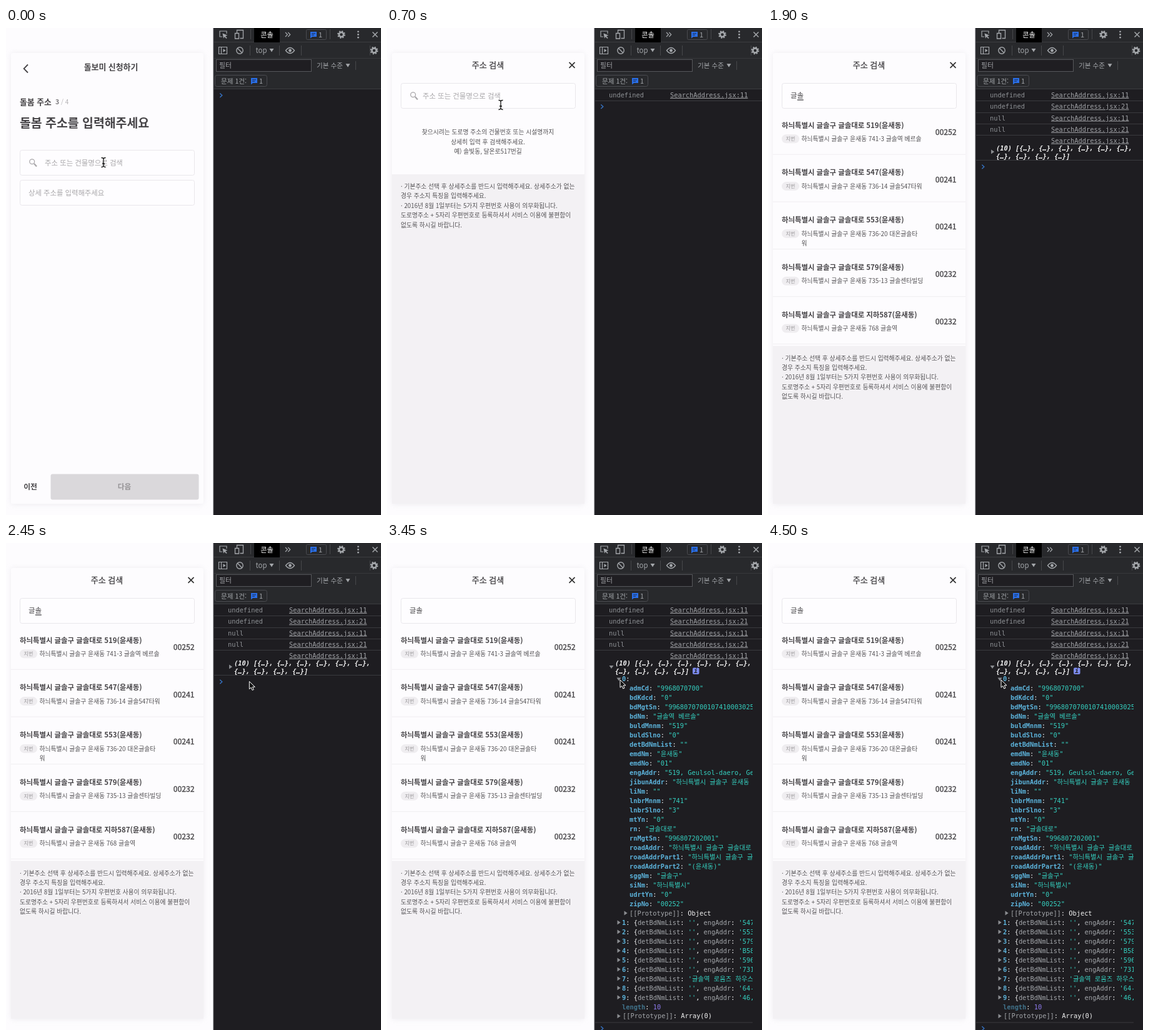
An HTML page that plays this animation: 600 px wide and 779 px high, repeating every 4550 ms.

```html
<!DOCTYPE html>
<html lang="ko">
<head>
<meta charset="utf-8">
<title>주소 검색</title>
<style>
html, body { margin: 0; width: 100%; height: 100%; overflow: hidden; background: #fdfcfe; }
svg { display: block; width: 100vw; height: 100vh; }
text { white-space: pre; font-family: "Noto Sans CJK KR", "Noto Sans CJK", "Noto Sans", sans-serif; }
.mono { font-family: "DejaVu Sans Mono", "Noto Sans CJK KR", "Noto Sans CJK", monospace; font-size: 10.33px; }
.b { font-weight: 700; }
.m { stroke: #464447; stroke-width: .35px; }
.log { fill: #8f9296; }
.link { fill: #a0a2a6; text-decoration: underline; }
.key { fill: #5cb3db; font-weight: 700; }
.dim { fill: #41738b; font-weight: 700; }
.str { fill: #35d0c0; }
.num { fill: #8f7cf0; }
.pale { fill: #a3a6aa; }
.wht { fill: #f3f3f3; }
</style>
</head>
<body>
<svg id="stage" viewBox="0 0 600 779" xmlns="http://www.w3.org/2000/svg"></svg>
<script>
const LOOP = 4550;
const INK = '#464447', TOOL = '#a4a7ab';

const text = (x, mid, s, size, fill, cls = '', anchor = 'start') =>
  `<text x="${x}" y="${mid + size * 0.37}" font-size="${size}" fill="${fill}" class="${cls}" text-anchor="${anchor}">${s}</text>`;
const rect = (x, y, w, h, fill, more = '') =>
  `<rect x="${x}" y="${y}" width="${w}" height="${h}" fill="${fill}" ${more}/>`;
const path = (d, stroke, w = 1, fill = 'none', more = '') =>
  `<path d="${d}" stroke="${stroke}" stroke-width="${w}" fill="${fill}" ${more}/>`;
const group = (id, body) => `<g id="${id}">${body}</g>`;
const mono = (x, mid, body, cls = '') => `<text x="${x}" y="${mid + 3.7}" class="mono ${cls}">${body}</text>`;
const span = (cls, s) => `<tspan class="${cls}">${s}</tspan>`;
const field = y => rect(22.5, y + .5, 279, 40, '#fefdff', 'rx="3" stroke="#e9e7eb"');
const lens = y => path(`M45 ${y + 2}L49 ${y + 6.5}`, '#a9a7aa', 2.2) +
  `<circle cx="41.7" cy="${y - 1.3}" r="3.9" fill="none" stroke="#a9a7aa" stroke-width="1.3"/>`;

// ---- left: form and search pages
const formPage = () =>
  path('M35 58.5L28.6 65L35 71.5', INK, 1.8) +
  text(168, 62.5, '돌보미 신청하기', 12.9, INK, 'b', 'middle') +
  text(22, 118, '돌봄 주소', 12.8, INK, 'b') +
  text(79, 118, '3', 10.5, '#7d7b7e', 'b') +
  text(88, 118, '/ 4', 10, '#b3b1b4') +
  text(22, 151.5, '돌봄 주소를 입력해주세요', 19.4, INK, 'b') +
  field(195) + lens(215) + text(62, 215.5, '주소 또는 건물명으로 검색', 11.4, '#a8a6a9') +
  field(243) + text(36, 263.5, '상세 주소를 입력해주세요', 11.35, '#a8a6a9') +
  text(39, 733.5, '이전', 11.8, INK, 'b', 'middle') +
  rect(71.5, 713.5, 237, 41, '#dad8db', 'rx="3"') +
  text(189.5, 733.5, '다음', 11.6, '#959396', 'b', 'middle');

const notice = [
  '· 기본주소 선택 후 상세주소를 반드시 입력해주세요. 상세주소가 없는',
  '경우 주소지 특징을 입력해주세요.',
  '· 2016년 8월 1일부터는 5가지 우편번호 사용이 의무화됩니다.',
  '도로명주소 + 5자리 우편번호로 등록하셔서 서비스 이용에 불편함이',
  '없도록 하시길 바랍니다.'
];
const guide = ['찾으시려는 도로명 주소의 건물번호 또는 시설명까지', '상세히 입력 후 검색해주세요.', '예) 솔빛동, 달온로517번길'];

const CITY = '하늬특별시 글솔구';
const places = [
  ['519', '741-3 글솔역 베르솔', '00252'],
  ['547', '736-14 글솔547타워', '00241'],
  ['553', '736-20 대온글솔타', '00241', '워'],
  ['579', '735-13 글솔센타빌딩', '00232'],
  ['지하587', '768 글솔역', '00232']
];
const placeRow = ([no, lot, zip, wrap], i) => {
  const y = 155.3 + i * 75.8;
  return text(22, y, `${CITY} 글솔대로 ${no}(윤새동)`, 11.4, INK, 'b') +
    rect(22, y + 15, 28, 14, '#efedf0', 'rx="7"') +
    text(36, y + 22, '지번', 8.1, '#99979a', '', 'middle') +
    text(53.5, y + 22, `${CITY} 윤새동 ${lot}`, 9.8, '#525053') +
    (wrap ? text(53.5, y + 37.3, wrap, 9.8, '#525053') : '') +
    text(301.5, y + 11, zip, 12.2, INK, 'm', 'end') +
    rect(8, y + 46.4, 308, 1, '#f0eef1');
};

const searchPage = () =>
  text(161.5, 59, '주소 검색', 13, INK, 'm', 'middle') +
  path('M291.5 54.8L300.5 63.8M300.5 54.8L291.5 63.8', '#333', 1.7) +
  field(88) +
  group('hint', lens(108) + text(57, 108.5, '주소 또는 건물명으로 검색', 11.4, '#a8a6a9')) +
  `<text id="typed" x="36" y="112.3" font-size="11.4" fill="#4d4b4e"></text>` +
  rect(36, 114.4, 10, 1.3, '#454346', 'id="compose"') +
  group('guide', guide.map((s, i) => text(161.5, 166.5 + i * 15.4, s, 9.78, '#525053', '', 'middle')).join('')) +
  group('rows', places.map(placeRow).join('')) +
  rect(8, 234, 308, 527, '#f3f1f4', 'id="sheet"') +
  group('notice', notice.map((s, i) => text(22, 253.5 + i * 15.35, s, 9.75, '#525053')).join(''));

// ---- right: developer tools
const gear = (x, y) =>
  `<circle cx="${x}" cy="${y}" r="3.6" fill="none" stroke="${TOOL}" stroke-width="2.6"/>` +
  `<circle cx="${x}" cy="${y}" r="5.4" fill="none" stroke="${TOOL}" stroke-width="2" stroke-dasharray="2.1 2.14"/>`;
const bubble = (x, y) => path(`M${x} ${y}h10v8h-7l-3 2.6z`, 'none', 0, '#2a6fe8') +
  path(`M${x + 2} ${y + 2.8}h6M${x + 2} ${y + 5.2}h4`, '#1d2a48', 1);
const bar = (x, y, h = 16) => rect(x, y, 1, h, '#46474b');
const drop = (x, y) => path(`M${x} ${y}h7l-3.5 5.5z`, 'none', 0, TOOL);

const toolbar = () =>
  rect(332, 0, 268, 97, '#28292c') + rect(332, 22, 268, 1, '#3c3d40') +
  rect(332, 48, 268, 1, '#37383b') + rect(332, 97, 268, 1, '#3b3c40') +
  path('M346 14h-4V5h11v4', TOOL, 1.2) + path('M346.5 8.5l8 3.2-3.4 1.2 2.6 3-1.4 1.2-2.6-3-1.7 2.6z', 'none', 0, TOOL) +
  path('M369.5 8V3.5h10v13h-5M366.5 8.5h6v8.5h-6z', TOOL, 1.3) +
  bar(391, 2) + rect(397, 0, 41, 23, '#000') + text(417.5, 10.5, '콘솔', 11.2, '#fff', '', 'middle') +
  path('M447 7l3.4 3.5-3.4 3.5M451.3 7l3.4 3.5-3.4 3.5', TOOL, 1.2) +
  rect(480.5, 2.5, 32, 16, 'none', 'rx="2" stroke="#4a4b50"') + bubble(487, 6) + text(500, 10.5, '1', 11, TOOL) +
  bar(518, 2) + gear(536.5, 10.5) +
  [5.8, 10.5, 15.2].map(y => `<circle cx="563.5" cy="${y}" r="1.4" fill="${TOOL}"/>`).join('') +
  path('M586.5 6.5l8 8M594.5 6.5l-8 8', TOOL, 1.5) +
  path('M340.5 30.5h13v11h-13zM344.5 30.5v11', TOOL, 1.2) + path('M347.5 33.3l4 2.7-4 2.7z', 'none', 0, TOOL) +
  `<circle cx="374" cy="36" r="5.2" fill="none" stroke="${TOOL}" stroke-width="1.4"/>` + path('M370.3 32.3l7.4 7.4', TOOL, 1.4) +
  bar(390, 28) + text(399.5, 36, 'top', 11.3, TOOL) + drop(421.5, 33) + bar(437, 28) +
  path('M447.5 36q7-9 14 0q-7 9-14 0z', TOOL, 1.3) + `<circle cx="454.5" cy="36" r="2.4" fill="${TOOL}"/>` +
  bar(472, 28) + bar(582, 28) + gear(589, 36) +
  rect(336.5, 50.5, 152, 19, '#1f1e22', 'stroke="#56575b"') + text(341, 60.3, '필터', 10.8, '#a0a2a6') +
  text(497, 60.3, '기본 수준', 10.6, TOOL) + drop(543.5, 57.3) + bar(559, 53, 14) +
  rect(334.5, 75.5, 83, 18, 'none', 'rx="3" stroke="#4a4b50"') + text(344, 84.7, '문제 1건:', 10.6, TOOL) +
  bubble(392, 80) + text(405, 84.7, '1', 10.8, TOOL);

const tri = (x, mid, open) => open
  ? path(`M${x - 1} ${mid - 2}h7l-3.5 5z`, 'none', 0, '#8b8d91')
  : path(`M${x} ${mid - 3.5}l5.2 3.5-5.2 3.5z`, 'none', 0, '#8b8d91');
const rule = y => rect(333, y, 267, 1, '#3a3b3f');
const logs = [['undefined', 11], ['undefined', 21], ['null', 11], ['null', 21]];
const logRow = ([s, line], i) => {
  const y = 107.2 + i * 18.3;
  return group('log' + i, mono(355, y, s, 'log') + mono(453, y, 'SearchAddress.jsx:' + line, 'link') + rule(Math.round(y + 9)));
};

const braces = n => Array(n).fill('{…}').join(', ');
const arrayRow = () =>
  mono(453, 180, 'SearchAddress.jsx:11', 'link') +
  `<g class="b" font-style="italic">` +
  mono(365, 192, `(10) [${braces(6)},`, 'wht') + mono(365, 205, braces(4) + ']', 'wht') + '</g>' +
  group('shut', tri(357, 198)) +
  group('open', tri(356.5, 198, true) + rect(489, 199.5, 10.5, 10.5, '#7d8cf0', 'rx="2"') +
    `<text x="494.2" y="208.2" class="mono b" font-style="italic" text-anchor="middle" fill="#20212a">i</text>`);

const STEP = 14.98, TOP = 217.5;
const heads = ['519', '547', '553', '579', 'B58', '596', '731', '', '64-', '46,'];
const itemRow = (head, i) => {
  const y = TOP + i * STEP;
  const tail = head
    ? span('str', "''") + span('wht', ', ') + span('pale', 'engAddr') + span('wht', ': ') + span('str', "'" + head)
    : span('str', "'글솔역 로움즈 하우스'");
  return tri(368.5, y) + mono(376, y, span('key', i) + span('wht', ': {') + span('pale', 'detBdNmList') + span('wht', ': ') + tail);
};
const proto = (x, y, s) => tri(x - 8.5, y) + mono(x, y, span('pale', '[[Prototype]]') + span('wht', ': ' + s));

const ROAD = CITY + ' 글솔대로 519';
const fields = {
  admCd: '9968070700', bdKdcd: '0', bdMgtSn: '9968070700107410003025518', bdNm: '글솔역 베르솔',
  buldMnnm: '519', buldSlno: '0', detBdNmList: '', emdNm: '윤새동', emdNo: '01',
  engAddr: '519, Geulsol-daero, Geulsol-gu', jibunAddr: CITY + ' 윤새동 741-3', liNm: '',
  lnbrMnnm: '741', lnbrSlno: '3', mtYn: '0', rn: '글솔대로', rnMgtSn: '996807202001',
  roadAddr: ROAD + '(윤새동)', roadAddrPart1: ROAD, roadAddrPart2: '(윤새동)',
  sggNm: '글솔구', siNm: '하늬특별시', udrtYn: '0', zipNo: '00252'
};
const detail = () => tri(368.5, TOP, true) + mono(376, TOP, span('key', '0') + span('wht', ':')) +
  Object.entries(fields).map(([k, v], i) =>
    mono(388, TOP + (i + 1) * STEP, span('key', k) + span('wht', ': ') + span('str', `"${v}"`))).join('') +
  proto(388, TOP + 25 * STEP, 'Object');
const rest = () => heads.slice(1).map((h, i) => itemRow(h, i + 1)).join('') +
  mono(376, TOP + 10 * STEP, span('dim', 'length') + span('wht', ': ') + span('num', '10')) +
  proto(377, TOP + 11 * STEP, 'Array(0)') + rule(392);

const BEAM = 'M-3.5 -7.5q3 0 3.5 1.8q.5-1.8 3.5-1.8M0 -6V6M-3.5 7.5q3 0 3.5-1.8q.5 1.8 3.5 1.8M-2 2h4';
const stage = document.getElementById('stage');
stage.innerHTML =
  '<defs><clipPath id="pane"><rect x="332" y="90" width="253" height="689"/></clipPath>' +
  '<filter id="soft" x="-10%" y="-10%" width="120%" height="120%"><feGaussianBlur stdDeviation="4"/></filter></defs>' +
  rect(0, 0, 600, 779, '#fdfcfe') +
  rect(8, 40, 308, 722, '#e9e7ec', 'rx="4" filter="url(#soft)" opacity=".75"') +
  rect(8, 40, 308, 721, '#fdfcfe', 'rx="3"') +
  group('form', formPage()) + group('search', searchPage()) +
  rect(332, 0, 268, 779, '#1e1d21') + toolbar() +
  logs.map(logRow).join('') + group('array', arrayRow()) + group('line', rule(211)) +
  '<g clip-path="url(#pane)">' + group('first', itemRow(heads[0], 0)) + group('detail', detail()) +
  group('rest', rest()) + '</g>' +
  group('prompt', path('M342.3 -3.3L345.8 0L342.3 3.3', '#3673c4', 1.4)) +
  rect(331.5, 0, 1, 779, '#4b4b50') +
  group('beam', path(BEAM, '#fff', 2.4, 'none', 'opacity=".6"') + path(BEAM, '#111', 1.3)) +
  group('arrow', path('M0 0V12.2L2.8 9.6L4.7 14L7 13L5.1 8.8H9z', '#fff', 1, '#111'));

const $ = {};
stage.querySelectorAll('[id]').forEach(e => $[e.id] = e);
const show = (id, on) => { $[id].style.display = on ? '' : 'none'; };
const move = (id, x, y) => $[id].setAttribute('transform', `translate(${x} ${y})`);

// ---- timeline
const T = { page: 50, logs: [100, 1200, 1300, 1750], found: 1850, open: 2750, detail: 3450 };
const typing = [[1200, 'ㄱ'], [1450, '그'], [1550, '글'], [1650, '글ㅅ'], [1750, '글소'], [1800, '글솔']];
const mouse = [[0, 156, 215], [500, 156, 215], [700, 182, 123], [850, 176, 113],
  [2150, 176, 113], [2400, 395, 226], [2600, 360, 198], [2900, 360, 198], [3200, 373, 219], [LOOP, 373, 219]];

function pointer(t) {
  let i = 0;
  while (i < mouse.length - 2 && t >= mouse[i + 1][0]) i++;
  const [t0, x0, y0] = mouse[i], [t1, x1, y1] = mouse[i + 1];
  const p = (t - t0) / (t1 - t0), e = p * p * (3 - 2 * p);
  return [x0 + (x1 - x0) * e, y0 + (y1 - y0) * e];
}

function draw(t) {
  const onSearch = t >= T.page, found = t >= T.found, open = t >= T.open, deep = t >= T.detail;
  show('form', !onSearch);
  show('search', onSearch);

  const word = typing.reduce((w, [at, s]) => t >= at ? s : w, '');
  $.typed.textContent = word;
  show('hint', !word);
  show('compose', word && !open);
  $.compose.setAttribute('x', 36.3 + (word.length - 1) * 10.5);

  show('guide', !found);
  show('rows', found);
  const shift = found ? 274.5 : 0;
  $.sheet.setAttribute('y', 234 + shift);
  $.sheet.setAttribute('height', 527 - shift);
  move('notice', 0, shift);

  T.logs.forEach((at, i) => show('log' + i, t >= at));
  const count = T.logs.filter(at => t >= at).length;
  show('array', found);
  show('line', found && !open);
  show('shut', !open);
  show('open', open);
  show('first', open && !deep);
  show('detail', deep);
  show('rest', open);
  const grow = deep ? 25 * STEP : 0;
  move('rest', 0, grow);
  move('prompt', 0, open ? 402 + grow : found ? 222 : 107.8 + count * 18);

  const [x, y] = pointer(t);
  const seen = t < 1200 || t >= 2150;
  const box = onSearch ? 88 : 195;
  const inField = x > 22 && x < 301 && y > box && y < box + 41;
  show('beam', seen && inField);
  show('arrow', seen && !inField);
  move('beam', x, y);
  move('arrow', x, y);
}

const start = performance.now();
function tick() {
  draw((performance.now() - start) % LOOP);
  requestAnimationFrame(tick);
}
draw(0);
requestAnimationFrame(tick);
</script>
</body>
</html>
```
